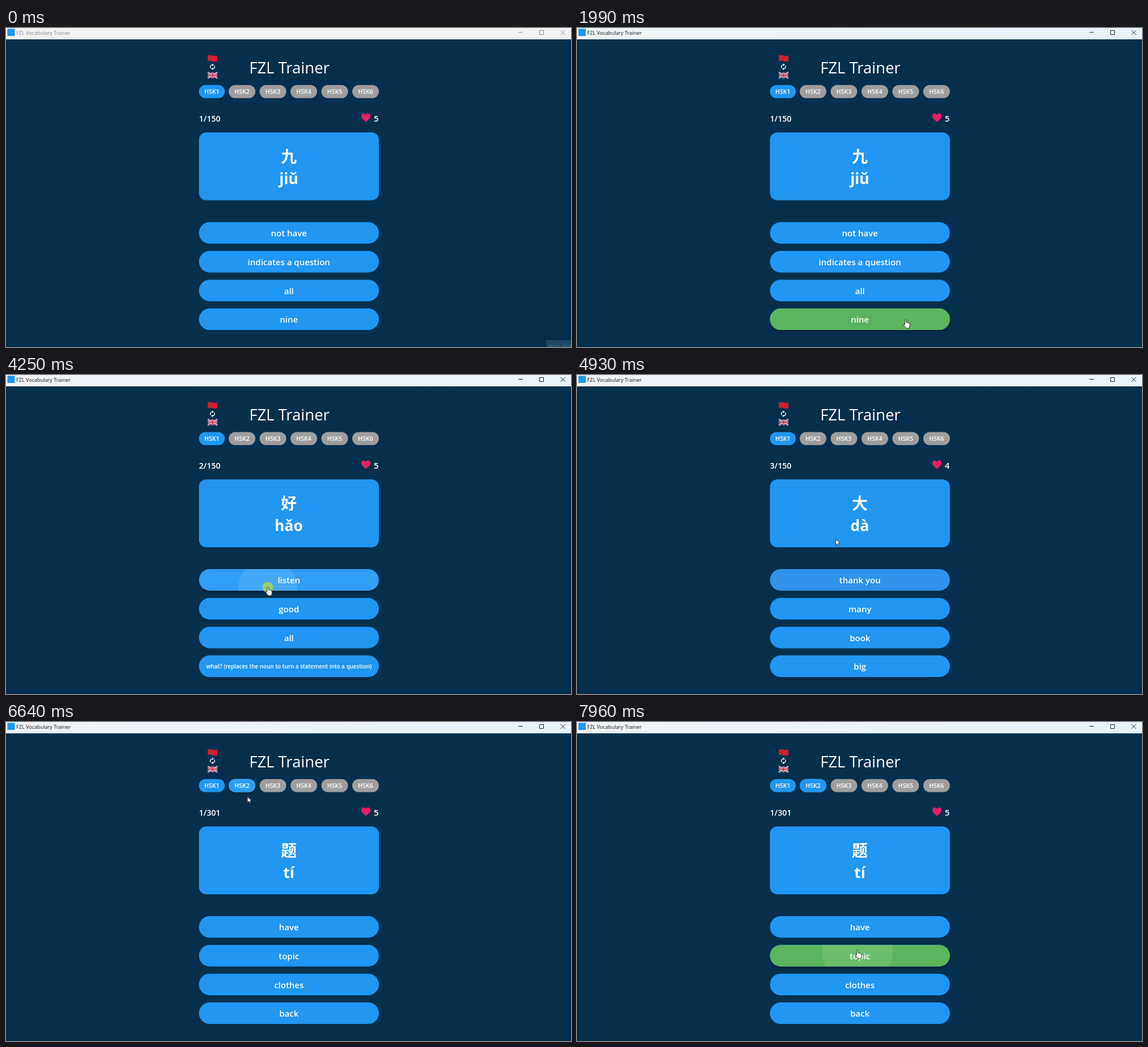
Write an HTML page that moves like this. It is 997 by 562 pixels and loops after 8000 ms.

```html
<!DOCTYPE html>
<html lang="en">
<head>
<meta charset="utf-8">
<title>FZL Vocabulary Trainer</title>
<style>
  html, body { margin: 0; width: 100%; height: 100%; overflow: hidden; background: #04304e; }
  svg { display: block; width: 997px; height: 562px; }
  text { font-family: "Open Sans", "Noto Sans", sans-serif; fill: #fff; }
  .semi { font-weight: 600; }
  .mid { text-anchor: middle; }
  #hanzi { font: 700 28px "Noto Sans CJK SC", "Noto Sans CJK JP", "Noto Sans CJK", sans-serif; }
  #pinyin { font: 600 26.5px "Noto Sans", "Open Sans", sans-serif; }
</style>
</head>
<body>
<svg id="stage" viewBox="0 0 997 562">
  <defs>
    <linearGradient id="barFill">
      <stop offset="0" stop-color="#f0f4f9"/>
      <stop offset="1" stop-color="#e9f3fa"/>
    </linearGradient>
    <filter id="blur" x="-5%" y="-40%" width="110%" height="180%"><feGaussianBlur stdDeviation="2.2"/></filter>
  </defs>
  <rect width="997" height="562" fill="#04304e"/>

  <rect id="bar" width="997" height="20"/>
  <rect x="2.5" y="1.5" width="13" height="12.5" fill="#2196f3"/>
  <text id="barTitle" x="18" y="11.5" font-size="9.1">FZL Vocabulary Trainer</text>
  <path id="barIcons" d="M904 7.5h8M941.5 4.5h7v7h-7zM978.5 4l8 8M986.5 4l-8 8" fill="none"/>

  <path d="M356 48.5q4-1.5 8.500 0t8.500 0v10q-4 1.500-8.500 0t-8.500 0z" fill="#cf2030"/>
  <g fill="none" stroke="#fff" stroke-width="1.4">
    <path d="M361.200 70.500a3.600 3.600 0 0 1 3.300-5.600M367.600 66.300a3.600 3.600 0 0 1-3.300 5.600"/>
    <path d="M364 62.600l2.700 2.300l-2.700 2.200zM364.800 69.700l-2.700 2.200l2.700 2.300z" fill="#fff" stroke="none"/>
  </g>
  <g>
    <rect x="356" y="78" width="17" height="10.500" fill="#2b3f86"/>
    <path d="M356 78l17 10.500M373 78l-17 10.500" stroke="#eee" stroke-width="2.200"/>
    <path d="M356 78l17 10.500M373 78l-17 10.500" stroke="#cf2338" stroke-width=".8"/>
    <path d="M364.500 78v10.500M356 83.250h17" stroke="#eee" stroke-width="3.400"/>
    <path d="M364.500 78v10.500M356 83.250h17" stroke="#cf2338" stroke-width="1.900"/>
  </g>

  <text class="mid" x="500" y="80" font-size="27.5">FZL Trainer</text>
  <g id="tabs"></g>
  <text id="count" class="semi" x="340.5" y="164.5" font-size="14.2"></text>
  <path d="M635 165.500C629 160.500 627 158 627 155C627 150 633 149 635 153C637 149 643.300 150 643.300 155C643.300 158 641 160.500 635 165.500z" fill="#e91e63"/>
  <text id="lives" class="semi" x="657.5" y="164.5" font-size="14.8" text-anchor="end"></text>

  <rect x="340.500" y="184" width="317.500" height="119.500" rx="13" fill="#2196f3"/>
  <text id="hanzi" class="mid" x="499" y="236.500"></text>
  <text id="pinyin" class="mid" x="499" y="274.500"></text>
  <g id="answers"></g>

  <g id="tooltip">
    <rect x="953" y="550" width="44" height="12" fill="#1f4862"/>
    <text x="958" y="564" font-size="9.500" style="fill:#4d7087">Auto Hide</text>
  </g>

  <g id="cursor" stroke-linejoin="round">
    <circle id="press" r="9.500" fill="#a4d257" opacity=".88"/>
    <path id="arrow" d="M0 0v10.500l2.500-2.300l1.700 3.700l1.800-.8l-1.700-3.600h3.300z" fill="#fff" stroke="#111" stroke-width=".8"/>
    <path id="hand" d="M-1.300 8.600V1.200q0-1.400 1.300-1.400t1.300 1.400v3.700q1.500-.8 2.200.5q1.400-.7 2.100.6q1.700-.4 1.700 1.500v3.200q0 1.800-1.400 4.200h-5.200q-1.300-2.200-4.200-5.400q-.6-1.300.5-1.600q.8-.1 1.700.7z" fill="#fff" stroke="#111" stroke-width=".9"/>
  </g>
</svg>
<script>
const LOOP = 8000, FADE = 150;
const BLUE = '#2196f3', GREEN = '#4caf50', RED = '#f44336', GREY = '#9e9e9e';
const $ = id => document.getElementById(id);
const clamp = v => Math.max(0, Math.min(1, v));

const questions = [
  { at: 0, count: '1/150', hanzi: '九', pinyin: 'jiǔ', answers: ['not have', 'indicates a question', 'all', 'nine'] },
  { at: 2060, count: '2/150', hanzi: '好', pinyin: 'hǎo',
    answers: ['listen', 'good', 'all', 'what? (replaces the noun to turn a statement into a question)'] },
  { at: 4790, count: '3/150', hanzi: '大', pinyin: 'dà', answers: ['thank you', 'many', 'book', 'big'] },
  { at: 5950, count: '1/301', hanzi: '题', pinyin: 'tí', answers: ['have', 'topic', 'clothes', 'back'] }
];

// Pill indices: 0-3 answers, 4-9 level tabs
const clicks = [
  { at: 1430, pill: 3, color: GREEN, until: 2060 },
  { at: 4250, pill: 0, color: RED, until: 4790 },
  { at: 5890, pill: 5, color: BLUE, until: LOOP },
  { at: 7890, pill: 1, color: GREEN, until: LOOP }
];
const hovers = [
  [3, 900, 2250], [0, 3170, 4800], [5, 5380, 6600], [0, 7380, 7530], [1, 7620, LOOP]
];
const RELEASE = 60;

// time, x, y of the pointer tip
const path = [
  [260, 947, 533], [400, 925, 470], [600, 790, 410], [800, 640, 445], [960, 545, 500], [1100, 530, 513],
  [1500, 530, 513], [1850, 580, 514], [2200, 580, 514], [2270, 612, 480], [2410, 726, 360],
  [2550, 690, 240], [2690, 546, 184], [2820, 440, 152], [2890, 426, 150], [2960, 450, 215],
  [3030, 500, 302], [3170, 475, 355], [3310, 462, 374], [4720, 462, 374], [4930, 457, 290],
  [5000, 438, 232], [5280, 407, 150], [5420, 420, 112], [5560, 424, 104], [6570, 424, 104],
  [6640, 426, 131], [6850, 440, 220], [7130, 475, 305], [7410, 492, 357], [7480, 493, 372], [7690, 495, 402]
];

function add(parent, tag, attrs) {
  const node = document.createElementNS('http://www.w3.org/2000/svg', tag);
  for (const key in attrs) node.setAttribute(key, attrs[key]);
  return parent.appendChild(node);
}

function makePill(parent, index, x, y, width, height, fill, fontSize) {
  const box = { x, y, width, height, rx: height / 2 };
  const shadow = add(parent, 'rect', { ...box, y: y + 2.5, fill: '#000', filter: 'url(#blur)' });
  add(parent, 'rect', { ...box, fill });
  const feedback = add(parent, 'rect', box);
  const glow = add(parent, 'rect', { ...box, fill: '#fff' });
  add(add(parent, 'clipPath', { id: 'clip' + index }), 'rect', box);
  const ripple = add(parent, 'circle', { fill: '#fff', 'clip-path': `url(#clip${index})` });
  const label = add(parent, 'text', {
    class: 'semi mid', x: x + width / 2, y: y + height / 2 + fontSize * 0.42, 'font-size': fontSize
  });
  return { x, y, width, height, shadow, feedback, glow, ripple, label };
}

const pills = [];
for (let i = 0; i < 4; i++)
  pills.push(makePill($('answers'), i, 340.5, 342 + i * 50.7, 317.5, 38, BLUE, 15));
for (let i = 0; i < 6; i++) {
  const x = i ? 393 + 54.5 * (i - 1) : 340.5;
  const pill = makePill($('tabs'), 4 + i, x, 100.5, i ? 47 : 45.5, 23, i ? GREY : BLUE, 10.5);
  pill.label.textContent = 'HSK' + (i + 1);
  pills.push(pill);
}

function pointerAt(t) {
  const next = path.findIndex(p => p[0] > t);
  if (next < 0) return path[path.length - 1].slice(1);
  if (next === 0) return path[0].slice(1);
  const [t0, x0, y0] = path[next - 1], [t1, x1, y1] = path[next];
  const k = (t - t0) / (t1 - t0);
  return [x0 + (x1 - x0) * k, y0 + (y1 - y0) * k];
}

const span = (t, from, to) => clamp((t - from) / FADE) * (1 - clamp((t - to) / FADE));

function drawPill(pill, index, t) {
  const hover = Math.max(0, ...hovers.filter(h => h[0] === index).map(h => span(t, h[1], h[2])));
  pill.shadow.setAttribute('opacity', 0.38 * hover);
  pill.glow.setAttribute('opacity', 0.08 * hover);

  const click = clicks.filter(c => c.pill === index && t >= c.at).pop();
  const age = click ? t - click.at : 0;
  const tinted = click && age >= RELEASE;
  pill.feedback.setAttribute('opacity', tinted ? 1 - clamp((t - click.until) / FADE) : 0);
  pill.ripple.setAttribute('opacity', click ? 0.1 * (1 - clamp((age - 140) / 250)) : 0);
  if (!click) return;
  pill.feedback.setAttribute('fill', click.color);
  const [cx, cy] = pointerAt(click.at);
  pill.ripple.setAttribute('cx', cx);
  pill.ripple.setAttribute('cy', cy + 2);
  pill.ripple.setAttribute('r', 52 + 10 * (age / 70) ** 2);
}

function drawQuestion(t) {
  const q = questions.filter(item => t >= item.at).pop();
  for (const key of ['count', 'hanzi', 'pinyin']) $(key).textContent = q[key];
  $('lives').textContent = t >= 4250 + RELEASE && t < 5950 ? 4 : 5;
  q.answers.forEach((answer, i) => {
    const { label, y } = pills[i];
    const long = answer.length > 30;
    label.textContent = answer;
    label.setAttribute('font-size', long ? 9.85 : 15);
    label.setAttribute('y', y + (long ? 23 : 25.3));
  });
}

function drawCursor(t) {
  const [x, y] = pointerAt(t);
  const over = pills.some(p => x >= p.x && x <= p.x + p.width && y >= p.y && y <= p.y + p.height);
  const pressed = clicks.some(c => t >= c.at && t < c.at + RELEASE);
  const show = (id, on) => $(id).setAttribute('visibility', on ? 'visible' : 'hidden');
  $('cursor').setAttribute('transform', `translate(${x} ${y})`);
  show('arrow', t >= 260 && !over);
  show('hand', t >= 260 && over);
  show('press', pressed);
}

function drawBar(t) {
  const active = t >= 1430;
  $('bar').setAttribute('fill', active ? 'url(#barFill)' : '#f3f3f3');
  $('barTitle').style.fill = active ? '#191919' : '#858585';
  $('barIcons').setAttribute('stroke', active ? '#222' : '#8a8a8a');
  $('tooltip').setAttribute('visibility', t < 70 ? 'visible' : 'hidden');
}

function render(t) {
  drawBar(t);
  drawQuestion(t);
  pills.forEach((pill, i) => drawPill(pill, i, t));
  drawCursor(t);
}

const start = performance.now();
function tick(now) {
  render(Math.max(0, now - start) % LOOP);
  requestAnimationFrame(tick);
}
render(0);
requestAnimationFrame(tick);
</script>
</body>
</html>
```
